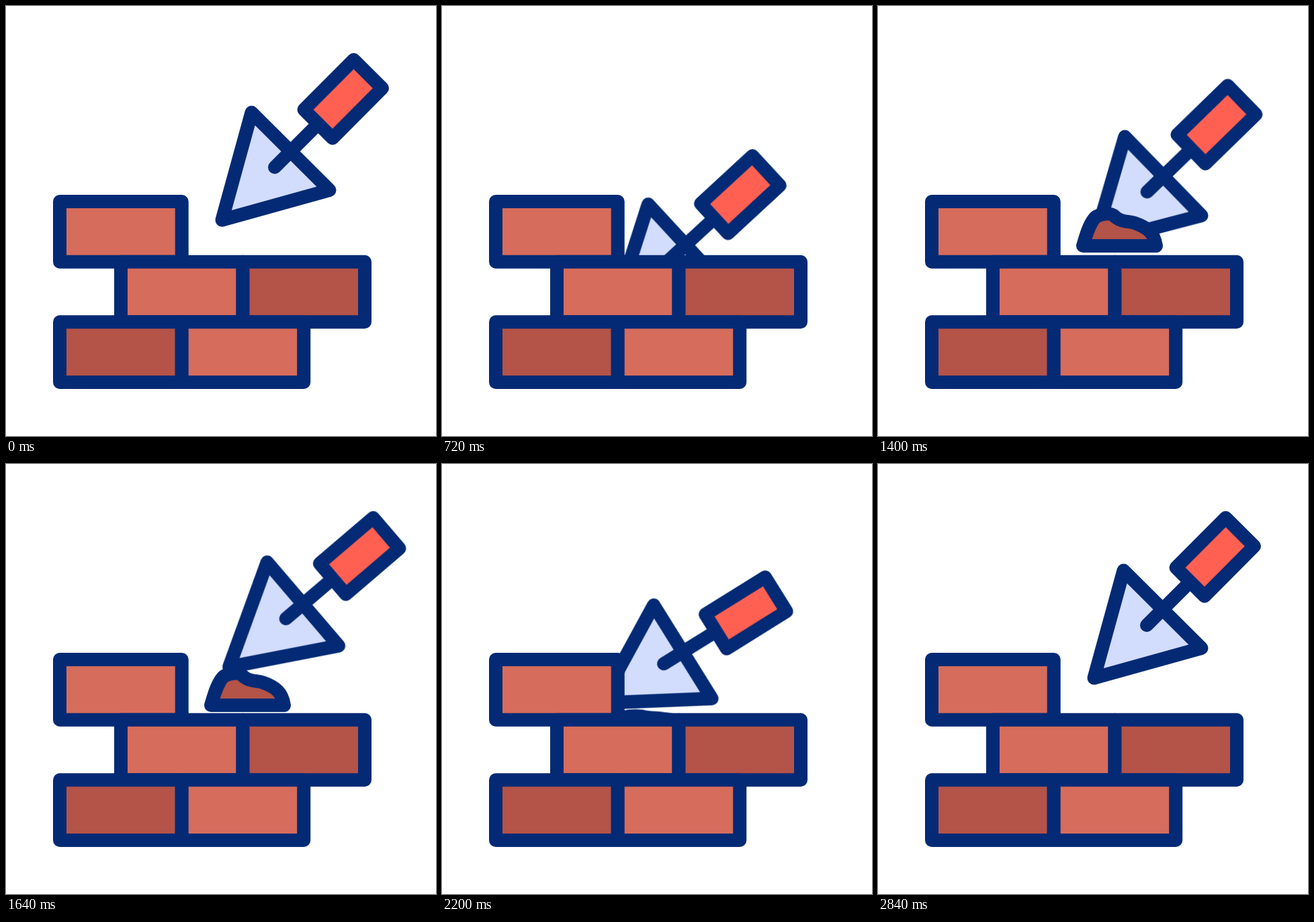
Write an HTML page that moves like this. It is 640 by 640 pixels and loops after 3000 ms.

```html
<!DOCTYPE html>
<html lang="en">
<head>
<meta charset="utf-8">
<title>Bricklaying</title>
<style>
html, body { margin: 0; width: 100%; height: 100%; overflow: hidden; background: #fff; }
svg { display: block; width: 100%; height: 100%; }

.line { stroke: #042a75; stroke-width: 20; stroke-linecap: round; stroke-linejoin: round; }
.light { fill: #d66c5c; }
.dark { fill: #b45348; }
.blade { fill: #d2dcfd; }
.grip { fill: #ff6051; }

.trowel {
  transform-origin: 400px 240px;
  animation: trowel 3s cubic-bezier(.33, 0, .67, 1) infinite;
}
.mortar { animation: mortar 3s cubic-bezier(.33, 0, .67, 1) infinite; }

@keyframes trowel {
  0%, 3.33% { transform: translate(0, 0) rotate(0deg); }
  /* wind up, then plunge behind the wall */
  13.67% { transform: translate(17px, -49px) rotate(15deg); animation-timing-function: cubic-bezier(.5, 0, .8, .7); }
  17.33% { transform: translate(-7px, 28.7px) rotate(10.3deg); animation-timing-function: cubic-bezier(.2, .3, .5, 1); }
  22%, 32.67% { transform: translate(-62px, 138px) rotate(2.4deg); }
  /* lift the mortar, tilt and drop */
  52.5% { transform: translate(17px, 10px) rotate(.5deg); }
  57.67% { transform: translate(16px, -41px) rotate(11deg); }
  62.67%, 63.33% { transform: translate(14.7px, 56px) rotate(13deg); }
  /* spread to the left and return */
  82.67% { transform: translate(-145.5px, 58.5px) rotate(13.4deg); }
  93.67%, 100% { transform: translate(0, 0) rotate(0deg); }
}

@keyframes mortar {
  0%, 21.33% {
    transform: translateY(50px);
    d: path("M279 384C282 375 284 364 287 358C288 354 289 353 290 356C294 373 303 380 316 384C346 388 378 388 400 389Z");
  }
  28%, 32.67% {
    transform: translateY(0);
    d: path("M279 384C282 375 284 364 287 358C288 354 289 353 290 356C294 373 303 380 316 384C346 388 378 388 400 389Z");
  }
  46.67%, 52.5% {
    transform: translateY(0);
    d: path("M305 357C309 343 314 325 323 315C329 310 344 307 351 312C361 322 372 320 382 323C402 330 411 338 414 357Z");
  }
  61.33%, 63.33% {
    transform: translateY(13.5px);
    d: path("M305 357C309 343 314 325 323 315C329 310 344 307 351 312C361 322 372 320 382 323C402 330 411 338 414 357Z");
  }
  78.33% {
    transform: translateY(0);
    d: path("M230 400C235 398 240 396 250 394C260 393 270 393 280 393C290 393 300 393 310 394C330 395 340 396 345 400Z");
  }
  78.4%, 100% {
    transform: translateY(50px);
    d: path("M279 384C282 375 284 364 287 358C288 354 289 353 290 356C294 373 303 380 316 384C346 388 378 388 400 389Z");
  }
}
</style>
</head>
<body>
<svg viewBox="0 0 640 640">
  <g class="line">
    <g class="trowel">
      <path class="blade" d="M365.5 158.5L481.5 274L321.5 318.5Z"/>
      <path d="M400 240L464 176"/>
      <path class="grip" d="M517.5 80L560 122.3L486 196.7L443.5 154.2Z"/>
    </g>
    <path class="mortar dark" d="M279 434C282 425 284 414 287 408C288 404 289 403 290 406C294 423 303 430 316 434C346 438 378 438 400 439Z"/>
    <rect class="light" x="80" y="291" width="181.7" height="89.7"/>
    <rect class="light" x="171" y="380.7" width="181.5" height="89.6"/>
    <rect class="dark" x="352.5" y="380.7" width="181.5" height="89.6"/>
    <rect class="dark" x="80" y="470.3" width="181.7" height="89.7"/>
    <rect class="light" x="261.7" y="470.3" width="181.5" height="89.7"/>
  </g>
</svg>
</body>
</html>
```
